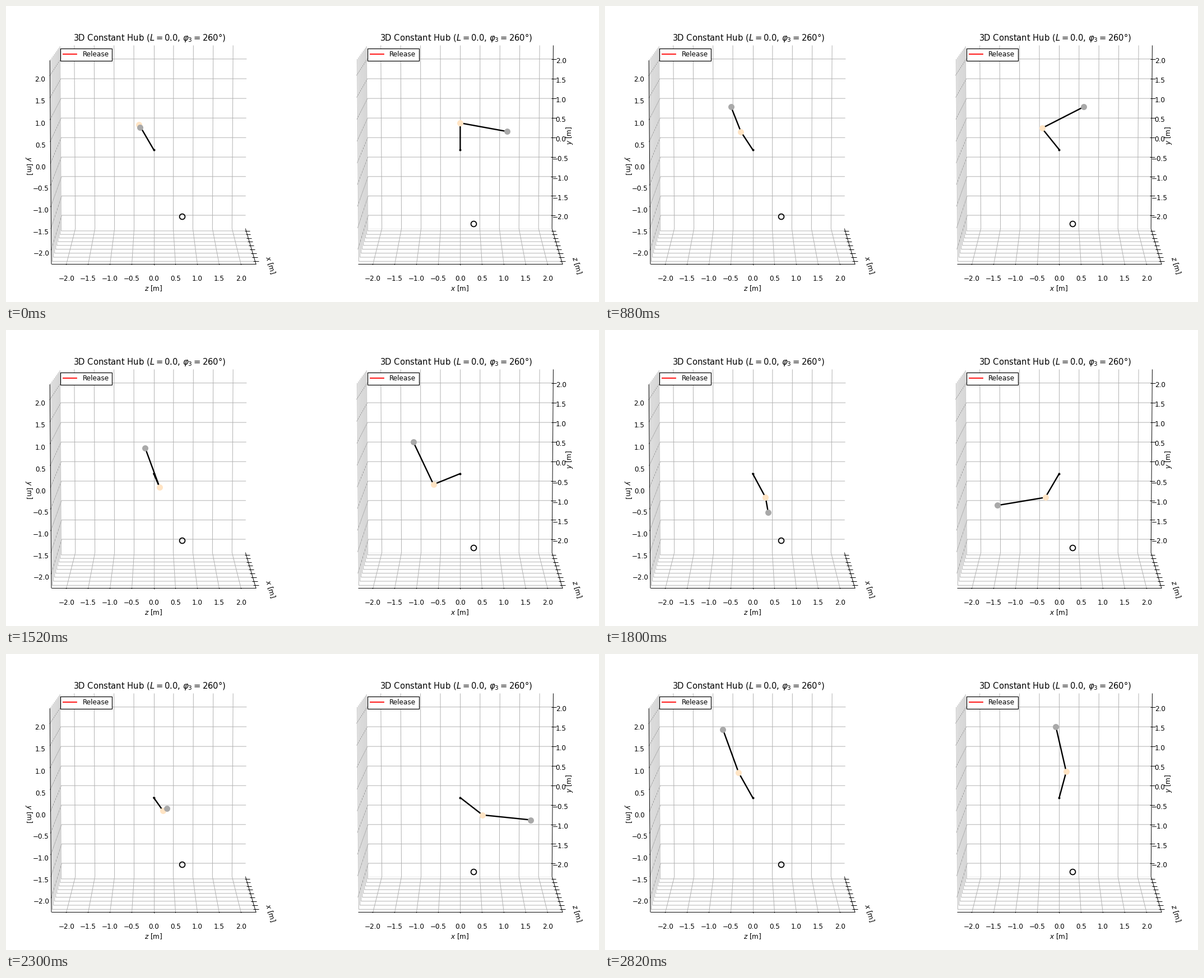
Recreate the animation shown at these times as a matplotlib script. Size 1058 by 529 pixels, loop 2840 ms.

```python
import numpy as np
import matplotlib.pyplot as plt
from matplotlib.animation import FuncAnimation
from matplotlib.collections import LineCollection
from matplotlib.patches import Rectangle

W, H, DPI = 1058, 529, 64
PX = 72 / DPI                      # points per pixel
FRAMES, STEP = 142, 20

# Camera: perspective view from distance 10, slightly above the floor
ELEV = np.radians(7.5)
UNIT, FOCAL = 0.23471, 3161
CY = 256.7
LIM = 2.34375
TICKS = np.arange(-2, 2.1, 0.5)

# Linkage
ARM, CLUB = 0.7, 1.157
ARM_TILT, CLUB_TILT = np.radians([30, 20])

# time [s], arm angle, club angle, club angle out of its plane [deg]
POSES = np.array([
    (0.00, 90.0, -9.9, -3.2),
    (0.56, 104.5, 7.5, -6.1),
    (0.80, 119.5, 21.5, -4.0),
    (1.08, 148.5, 49.5, -1.4),
    (1.18, 160.5, 61.0, -1.0),
    (1.52, 203.7, 115.1, 1.1),
    (1.62, 217.0, 138.4, 1.3),
    (2.06, 280.0, 275.4, -2.5),
    (2.16, 296.0, 309.0, -0.6),
    (2.54, 367.0, 417.3, 8.4),
    (2.70, 404.0, 448.0, 6.3),
    (2.82, 436.0, 462.6, 0.8),
])
KEYS, ANGLES = POSES[:, 0], POSES[:, 1:]
SLOPES = np.gradient(ANGLES, KEYS, axis=0, edge_order=2)
SLOPES[0] = 0


def angles_at(t):
    """Cubic Hermite interpolation of the pose angles, in radians."""
    i = int(np.clip(np.searchsorted(KEYS, t, side="right") - 1, 0, len(KEYS) - 2))
    h = KEYS[i + 1] - KEYS[i]
    s = (t - KEYS[i]) / h
    rise = s * s * (3 - 2 * s)
    value = (ANGLES[i] * (1 - rise) + ANGLES[i + 1] * rise
             + h * s * (1 - s) ** 2 * SLOPES[i]
             - h * s * s * (1 - s) * SLOPES[i + 1])
    return np.radians(value)


def joints(t):
    """Hand and club head positions as (x, y, z)."""
    a, b, g = angles_at(t)
    hand = ARM * np.array([np.cos(a),
                           np.sin(a) * np.cos(ARM_TILT),
                           -np.sin(a) * np.sin(ARM_TILT)])
    c, s = np.cos(CLUB_TILT), np.sin(CLUB_TILT)
    flat = np.cos(g) * np.sin(b)
    club = CLUB * np.array([np.cos(g) * np.cos(b),
                            flat * c + np.sin(g) * s,
                            -flat * s + np.sin(g) * c])
    return hand, hand + club


def project(p, cx):
    """Screen position of (right, up, toward the viewer)."""
    r, u, n = np.asarray(p, float) * UNIT
    depth = 10 - (u * np.sin(ELEV) + n * np.cos(ELEV))
    v = u * np.cos(ELEV) - n * np.sin(ELEV)
    return np.array([cx + FOCAL * r / depth, CY - FOCAL * v / depth])


fig = plt.figure(figsize=(W / DPI, H / DPI), dpi=DPI, facecolor="white")
plt.rcParams["font.family"] = "DejaVu Sans"
plt.rcParams["mathtext.fontset"] = "dejavusans"
ax = fig.add_axes([0, 0, 1, 1])
ax.set_xlim(0, W)
ax.set_ylim(H, 0)
ax.axis("off")


def label(x, y, s, size=12, **kw):
    kw = {"ha": "center", "va": "center", **kw}
    ax.text(x, y, s, fontsize=size * PX, color="black", **kw)


def lines(paths, cx, color, width, z):
    segs = [[project(p, cx) for p in path] for path in paths]
    ax.add_collection(LineCollection(segs, colors=color,
                                     linewidths=width * PX, zorder=z))


def dot(size, color, z):
    return ax.plot([], [], "o", ms=size * PX, color=color,
                   mew=0, zorder=z)[0]


class Panel:
    def __init__(self, cx, title_x, names, view, y_at_back, ring):
        self.cx, self.view = cx, view
        self.draw_box(y_at_back)
        self.draw_text(title_x, names, y_at_back)
        self.draw_legend(title_x - 158)
        ax.plot(*ring, "o", ms=9.8 * PX, mfc="none", mec="black",
                mew=1.8 * PX, zorder=4)
        self.rod, = ax.plot([], [], color="black", lw=2.4 * PX, zorder=5)
        self.hub = dot(4, "black", 6)
        self.hand = dot(11, "bisque", 7)
        self.head = dot(11, "darkgray", 8)

    def draw_box(self, y_at_back):
        L, cx = LIM, self.cx
        grid = []
        for a in TICKS:
            grid += [[(a, L, -L), (a, -L, -L), (a, -L, L)],
                     [(L, a, -L), (-L, a, -L), (-L, a, L)],
                     [(-L, L, a), (-L, -L, a), (L, -L, a)]]
        if y_at_back:
            lines([[(-L, -L, -L), (L, -L, -L)]], cx, "#ebebeb", 1, 0)
        lines(grid, cx, "#b0b0b0", 0.96, 1)

        sx, sz = (L, -L) if y_at_back else (-L, L)
        lines([[(-L, -L, L), (L, -L, L)],
               [(L, -L, L), (L, -L, -L)],
               [(sx, -L, sz), (sx, L, sz)]], cx, "black", 0.96, 2)

        near, far = 0.04, 0.085
        marks = []
        for a in TICKS:
            marks += [[(L - near, -L, a), (L + far, -L, a)],
                      [(a, -L, L - near), (a, -L, L + far)]]
            if y_at_back:
                marks.append([(L - near, a, -L), (L + far, a, -L)])
            else:
                marks.append([(-L, a, L - near), (-L, a, L + far)])
        lines(marks, cx, "black", 0.96, 2)

    def draw_text(self, title_x, names, y_at_back):
        L, cx = LIM, self.cx
        across, deep = names
        label(title_x, 62.2, r"3D Constant Hub ($L=0.0$, $\varphi_3=260°$)",
              14.8, va="baseline")
        for a in TICKS:
            text = f"{a:.1f}".replace("-", "\u2212")
            x, y = project((a, -L, L), cx)
            label(x, y + 25.9, text)
            if y_at_back:
                x, y = project((L, a, -L), cx)
                label(x + 14.5, y + 3.7, text)
            else:
                x, y = project((-L, a, L), cx)
                label(x - 18, y + 7.3, text)
        label(cx - 0.3, 505, f"${across}$ [m]")
        if y_at_back:
            label(1006, 231.5, "$y$ [m]", rotation=90)
        else:
            label(40.5, 286, "$y$ [m]", rotation=270)
        label(cx + 208, 463, f"${deep}$ [m]", rotation=-74)

    def draw_legend(self, x):
        ax.add_patch(Rectangle((x - 0.5, 75.6), 92, 22.4, fc="white",
                               ec="black", lw=1.2 * PX, zorder=9))
        ax.plot([x + 4.3, x + 28.3], [86.2, 86.2], color="red",
                lw=1.8 * PX, zorder=10)
        label(x + 38.9, 90.3, "Release", ha="left", va="baseline", zorder=10)

    def pose(self, hand, head):
        pts = np.array([project(self.view(p), self.cx)
                        for p in (np.zeros(3), hand, head)])
        self.rod.set_data(pts[:, 0], pts[:, 1])
        for mark, (x, y) in zip((self.hub, self.hand, self.head), pts):
            mark.set_data([x], [y])
        return [self.rod, self.hub, self.hand, self.head]


panels = [
    Panel(263.5, 255.8, "zx", lambda p: (p[2], p[1], -p[0]), False,
          ([314.3], [376.2])),
    Panel(810.4, 803.4, "xz", lambda p: p, True,
          ([834.1], [389.1])),
]


def update(i):
    hand, head = joints(i * STEP / 1000)
    return [artist for panel in panels for artist in panel.pose(hand, head)]


anim = FuncAnimation(fig, update, frames=FRAMES, interval=STEP,
                     init_func=lambda: update(0), repeat=True,
                     repeat_delay=0, blit=False)
plt.show()
```
